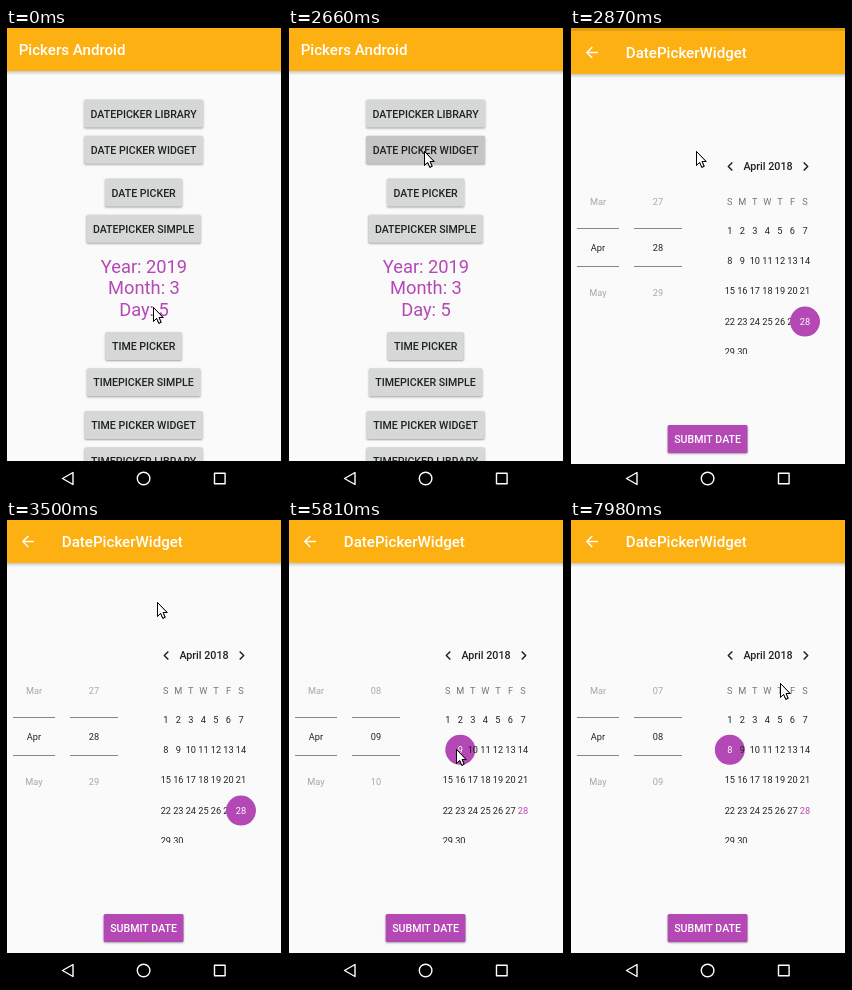
Recreate the animation shown at these times as an HTML page with a canvas. Size 276 px wide and 464 px high, loop 8 s.

```html
<!DOCTYPE html>
<html lang="en">
<head>
<meta charset="utf-8">
<title>Pickers</title>
<style>
html, body { margin: 0; width: 276px; height: 464px; overflow: hidden; background: #000; }
canvas { display: block; width: 276px; height: 464px; }
</style>
</head>
<body>
<canvas id="stage"></canvas>
<script>
const W = 276, H = 464, MID = 137.6, NAV_TOP = 433, LOOP = 8000, STEP = 70;
const AMBER = '#fcb012', PURPLE = '#b448b4', PAPER = '#fafafa', INK = '#212121';
const BUTTON_TEXT = 10.6, SMALL_TEXT = 9.2;
const canvas = document.getElementById('stage');
const g = canvas.getContext('2d');
const dpr = window.devicePixelRatio || 1;
canvas.width = W * dpr;
canvas.height = H * dpr;

// Pointer glides: start time and destination; each takes GLIDE ms
const GLIDE = 350, ORIGIN = [147, 279];
const glides = [
  [70, 132, 241], [560, 134, 290], [1120, 136, 123], [2660, 124, 123],
  [3010, 151, 82], [3570, 222, 150], [3780, 214, 268], [4000, 192, 229],
  [4620, 179, 229], [5320, 174, 229], [5740, 158, 229], [6300, 211, 230],
  [6650, 212, 169], [6930, 213, 355], [7350, 210, 163]
];

// Each tap picks the day before, starting at the 11th
const tapTimes = [4620, 5040, 5670, 6230], FIRST_TAP = 11, TODAY = 28, TAP = 140;

const clamp = v => Math.max(0, Math.min(1, v));
const easeOut = (p, power = 2) => 1 - (1 - clamp(p)) ** power;

// Overlapping glides add up, so the pointer never jumps
function pointerAt(t) {
  let [x, y] = ORIGIN, from = ORIGIN;
  for (const [start, ...to] of glides) {
    const k = easeOut((t - start) / GLIDE);
    x += (to[0] - from[0]) * k;
    y += (to[1] - from[1]) * k;
    from = to;
  }
  return [Math.round(x), Math.round(y)];
}

function rect(x, y, w, h, color) {
  g.fillStyle = color;
  g.fillRect(x, y, w, h);
}

// y is the middle of the capitals
function text(str, x, y, size, color = INK, weight = 400, align = 'center') {
  g.font = `${weight} ${size}px Roboto, sans-serif`;
  g.textAlign = align;
  g.fillStyle = color;
  g.fillText(str, x, Math.round(y + size * 0.355));
}

function line(points, color, width, close) {
  g.beginPath();
  points.forEach(([x, y]) => g.lineTo(x, y));
  if (close) g.closePath();
  g.strokeStyle = color;
  g.lineWidth = width;
  g.stroke();
}

function disc(x, y, r, color) {
  g.beginPath();
  g.arc(x, y, r, 0, 7);
  g.fillStyle = color;
  g.fill();
}

function button(label, y, fill, color) {
  g.font = `500 ${BUTTON_TEXT}px Roboto, sans-serif`;
  const w = g.measureText(label).width + 13;
  g.save();
  g.shadowColor = 'rgba(0,0,0,.35)';
  g.shadowBlur = 2 * dpr;
  g.shadowOffsetY = dpr;
  g.fillStyle = fill;
  g.beginPath();
  g.roundRect(MID - w / 2, y - 14, w, 28, 1.5);
  g.fill();
  g.restore();
  text(label, MID, y + 0.3, BUTTON_TEXT, color, 500);
}

function page(title, x) {
  rect(0, 0, W, NAV_TOP, PAPER);
  const shade = g.createLinearGradient(0, 43, 0, 47);
  shade.addColorStop(0, 'rgba(0,0,0,.2)');
  shade.addColorStop(1, 'rgba(0,0,0,0)');
  rect(0, 43, W, 4, shade);
  rect(0, 0, W, 43, AMBER);
  text(title, x, 22, 15.1, '#fff', 500, 'left');
}

function clipped(bottom, draw) {
  g.save();
  g.beginPath();
  g.rect(0, 0, W, bottom);
  g.clip();
  draw();
  g.restore();
}

// Four buttons in two pairs
function buttonBlock(top, labels, fillOf) {
  labels.forEach((label, i) =>
    button(label, top + 79 * (i >> 1) + 36.2 * (i % 2), fillOf(label), INK));
}

function home(t) {
  const fillOf = label => label !== 'DATE PICKER WIDGET' || t < 2450 ? '#d6d7d7'
    : t < 2660 ? '#cfd0d0' : '#c5c5c5';
  page('Pickers Android', 12.7);
  buttonBlock(85.6, ['DATEPICKER LIBRARY', 'DATE PICKER WIDGET', 'DATE PICKER', 'DATEPICKER SIMPLE'], fillOf);
  buttonBlock(318, ['TIME PICKER', 'TIMEPICKER SIMPLE', 'TIME PICKER WIDGET', 'TIMEPICKER LIBRARY'], fillOf);
  ['Year: 2019', 'Month: 3', 'Day: 5'].forEach((s, i) =>
    text(s, 138, 238.5 + 21.5 * i, 18.3, PURPLE));
}

function wheel(x, half, labels) {
  labels.forEach((s, i) =>
    text(s, x, 171 + 45.6 * i, SMALL_TEXT, i === 1 ? INK : '#a8a8a8'));
  for (const y of [197, 235]) rect(x - half, y, half * 2, 1, '#858585');
}

function calendar(chosen, pressed) {
  const colX = c => 159.8 + 12.53 * c;
  text('April 2018', 198, 135.5, 10.73, INK, 500);
  for (const side of [-1, 1]) {
    const x = 198 + 37.7 * side;
    line([[x - 2 * side, 131.5], [x + 2 * side, 135.5], [x - 2 * side, 139.5]], INK, 1.5);
  }
  [...'SMTWTFS'].forEach((s, c) => text(s, colX(c), 170.5, SMALL_TEXT, '#757575'));
  clipped(323, () => {
    for (let day = 1; day <= 30; day++) {
      const x = colX((day - 1) % 7), y = 199.4 + 30.4 * Math.floor((day - 1) / 7);
      const on = day === chosen;
      if (on || day === pressed) disc(x, y, 15, on ? PURPLE : 'rgba(180,72,180,.45)');
      text(day, x, y, SMALL_TEXT, on ? '#fff' : day === TODAY ? PURPLE : INK);
    }
  });
}

function widget(t) {
  page('DatePickerWidget', 55.8);
  line([[28, 21.5], [16.8, 21.5]], '#fff', 1.4);
  line([[22.3, 16], [16.8, 21.5], [22.3, 27]], '#fff', 1.4);
  let chosen = TODAY, pressed = 0;
  tapTimes.forEach((at, i) => {
    if (t >= at + TAP) chosen = FIRST_TAP - i;
    else if (t >= at) pressed = FIRST_TAP - i;
  });
  wheel(28, 21, ['Mar', 'Apr', 'May']);
  wheel(88, 24, [-1, 0, 1].map(d => String(chosen + d).padStart(2, '0')));
  calendar(chosen, pressed);
  button('SUBMIT DATE', 408, PURPLE, '#fff');
}

function navIcons() {
  line([[56.5, 450.5], [67, 444.5], [67, 456.5]], '#fff', 1.4, true);
  g.beginPath();
  g.arc(MID, 450.5, 6.3, 0, 7);
  g.stroke();
  g.strokeRect(208.5, 445.2, 10.6, 10.6);
}

function pointer([x, y]) {
  const shape = [[0, 0], [0, 13.8], [3.2, 10.9], [5.3, 15.8], [7.6, 14.8], [5.5, 10], [9.6, 10]];
  line(shape.map(p => [x + 0.5 + p[0], y + 0.5 + p[1]]), '#000', 1, true);
  g.fillStyle = '#fff';
  g.fill();
  g.stroke();
}

function draw(t) {
  g.setTransform(dpr, 0, 0, dpr, 0, 0);
  g.lineJoin = 'round';
  rect(0, 0, W, H, '#000');
  const slide = clamp((t - 2700) / 440);
  if (slide < 1) clipped(NAV_TOP, () => home(t));
  if (slide > 0) {
    const fade = easeOut((t - 2700) / 160);
    if (slide < 1) rect(0, 0, W, NAV_TOP, `rgba(0,0,0,${0.1 * fade})`);
    g.save();
    g.globalAlpha = fade;
    g.translate(0, Math.round(33 * (1 - easeOut(slide, 5))));
    widget(t);
    g.restore();
  }
  navIcons();
  rect(0, 0, 1, H, '#000');
  rect(W - 1, 0, 1, H, '#000');
  pointer(pointerAt(t));
}

const start = performance.now();
function tick() {
  const t = (performance.now() - start) % LOOP;
  draw(Math.floor(t / STEP) * STEP);
  requestAnimationFrame(tick);
}
tick();
</script>
</body>
</html>
```
